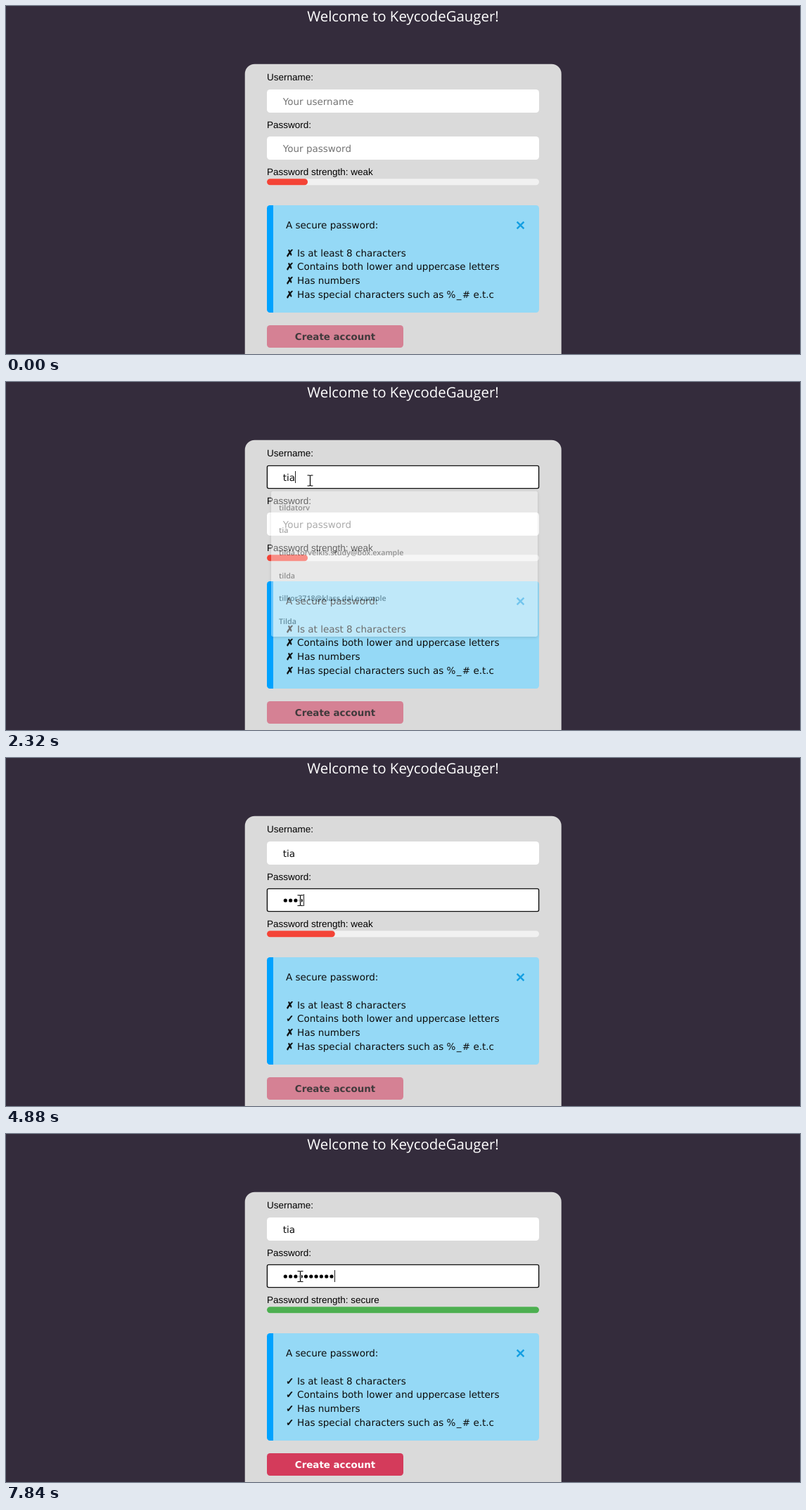
Animation, 1129 px wide and 496 px high, one loop 7.99 s. Source, as an HTML page:

```html
<!DOCTYPE html>
<html lang="en">
<head>
<meta charset="utf-8">
<title>Sign-up form</title>
<style>
html, body { margin: 0; width: 100%; height: 100%; overflow: hidden; background: #342c3c; }
svg { display: block; text-rendering: geometricPrecision; }
text { font: 13.5px "DejaVu Sans", Verdana, sans-serif; fill: #0c0c0c; white-space: pre; }
.title { font: 20.4px "Open Sans", "Noto Sans", sans-serif; fill: #fff; }
.label { font: 13.5px "Liberation Sans", Arial, sans-serif; fill: #000; }
.hint { fill: #757575; }
.btn { font-weight: bold; font-size: 13.4px; }
.mark { stroke: #0c0c0c; stroke-width: .6; }
#menu text { font: 600 10.7px "Open Sans", "Noto Sans", sans-serif; fill: #222; }
#menu rect { fill: #fff; filter: drop-shadow(0 1px 2px rgba(0, 0, 0, .35)); }
.field { fill: #fff; }
.ring { fill: none; stroke: #101010; stroke-width: 1.4; }
#beam path { fill: none; stroke: #fff; stroke-width: 3; }
#beam path + path { stroke: #000; stroke-width: 1.2; }
</style>
</head>
<body>
<svg width="1129" height="496" viewBox="0 0 1129 496">
  <rect width="1129" height="496" fill="#342c3c"/>
  <text class="title" x="564.5" y="21.5" text-anchor="middle">Welcome to KeycodeGauger!</text>
  <rect x="339.7" y="82.7" width="450" height="440" rx="14" fill="#dadada"/>

  <text class="label" x="371" y="106.2">Username:</text>
  <rect class="field" x="371" y="119" width="387" height="33" rx="4.5"/>
  <rect class="ring" id="userRing" x="371.4" y="119.4" width="386.2" height="32.2" rx="2"/>
  <text class="hint" id="userHint" x="393.8" y="140.7">Your username</text>
  <text id="user" x="393.8" y="140.7"></text>

  <text class="label" x="371" y="173.5">Password:</text>
  <rect class="field" x="371" y="186" width="387" height="33" rx="4.5"/>
  <rect class="ring" id="passRing" x="371.4" y="186.4" width="386.2" height="32.2" rx="2"/>
  <text class="hint" id="passHint" x="393.8" y="207.8">Your password</text>
  <g id="dots"></g>
  <rect id="caret" width="1" height="17" fill="#222"/>

  <text class="label" id="strength" x="371" y="240.7"></text>
  <rect x="371" y="246.2" width="387" height="9" rx="4.5" fill="#f1f1f1"/>
  <rect id="bar" x="371" y="246.2" height="9" rx="4.5"/>

  <rect x="371" y="284" width="387" height="153" rx="4.5" fill="#95d9f6"/>
  <path d="M380 284H375.5A4.5 4.5 0 0 0 371 288.5V432.5A4.5 4.5 0 0 0 375.5 437H380Z" fill="#00a2ff"/>
  <text x="398" y="317">A secure password:</text>
  <path d="M726.6 307.6l9.8 9.8m0-9.8l-9.8 9.8" stroke="#149fe2" stroke-width="2.4"/>
  <g id="rules"></g>

  <rect id="button" x="371" y="455" width="194" height="32" rx="4.5"/>
  <text class="btn" id="buttonText" x="468" y="476" text-anchor="middle">Create account</text>

  <g id="menu"><rect x="371" y="152.5" height="207.5" rx="3"/></g>

  <path id="arrow" d="M0 0V14.6L3.4 11.5 5.6 16.6 8 15.6 5.8 10.6H10.4Z" fill="#fff" stroke="#222" stroke-width="1"/>
  <g id="beam">
    <path d="M-4 -7.5H-1L0 -6.8 1 -7.5H4M0 -7V7M-4 7.5H-1L0 6.8 1 7.5H4"/>
    <path d="M-4 -7.5H-1L0 -6.8 1 -7.5H4M0 -7V7M-4 7.5H-1L0 6.8 1 7.5H4"/>
  </g>
</svg>
<script>
const LOOP = 7990, STEP = 79;
const $ = id => document.getElementById(id);
const count = (times, t) => times.filter(x => t >= x).length;
const show = (el, on) => { el.style.display = on ? '' : 'none'; };

function add(parent, tag, attrs) {
  const el = document.createElementNS('http://www.w3.org/2000/svg', tag);
  for (const key in attrs) el.setAttribute(key, attrs[key]);
  return parent.appendChild(el);
}

const NAME = 'tia';
const nameKeys = [1770, 2090, 2240];
const passKeys = [4170, 4420, 4570, 4880, 5110, 5260, 5490, 5960, 6910, 7750];
const caretOff = [[1540, 1770], [2780, 3250], [3940, 4170], [6510, 6910], [7440, 7750]];
const FOCUS_USER = 980, FOCUS_PASS = 3250;

const levels = [
  [0, 'weak', '#f44336', .15],
  [4260, 'weak', '#f44336', .25],
  [6190, 'medium', '#ff9800', .6],
  [7840, 'secure', '#4caf50', 1]
];
const rules = [
  ['Is at least 8 characters', 6190],
  ['Contains both lower and uppercase letters', 4650],
  ['Has numbers', 7840],
  ['Has special characters such as %\u200a_\u200a# e.t.c', 6980]
];
const saved = ['tildatorv', 'tia', 'gelkvist@tiles.example', 'tilda.torvelkis.study@box.example',
  'tilda', 'tilkor3718@klass.dal.example', 'Tilda'];
const matches = saved.filter(s => /^t/i.test(s));

// time, x, y of the pointer
const route = [
  [350, 1112, 484], [430, 1058, 450], [510, 940, 386], [665, 640, 236],
  [825, 462, 154], [905, 432.5, 140.5], [2700, 432.5, 140.5],
  [2930, 429.5, 173], [3090, 427, 190], [3330, 423.5, 200], [3470, 418.5, 203]
];

const marks = rules.map(([label], i) => {
  const y = 356.5 + i * 19.8;
  add($('rules'), 'text', { x: 414, y }).textContent = label;
  return add($('rules'), 'text', { x: 398, y, class: 'mark' });
});
const dots = passKeys.map((_, i) => add($('dots'), 'circle', { cx: 397.3 + i * 7.3, cy: 203, r: 2.6 }));
const menuRect = $('menu').querySelector('rect');
const rows = matches.map((_, i) => add($('menu'), 'text', { x: 382, y: 179.6 + i * 32.4 }));

function pointer(t) {
  if (t < route[0][0]) return null;
  const next = route.findIndex(p => p[0] > t);
  if (next < 0) return route[route.length - 1].slice(1);
  const [t0, x0, y0] = route[next - 1], [t1, x1, y1] = route[next];
  const k = (t - t0) / (t1 - t0);
  return [x0 + (x1 - x0) * k, y0 + (y1 - y0) * k];
}

function stepped(t) {
  for (const [a, b] of [[350, 1140], [2780, 3330]])
    if (t >= a && t < b) return a + Math.floor((t - a) / STEP) * STEP;
  if (t >= 2540 && t < 2780) return 2540;
  return t >= 3330 && t < 3470 ? 3330 : t;
}

function drawMenu(t) {
  const fade = [[1060, .6, 0], [1140, 1, 0], [2240, .78, .35], [2320, .4, 1], [2400, .12, 1.4], [2470, 0, 0]];
  const now = fade[count(fade.map(f => f[0]), t) - 1];
  show($('menu'), now && now[1]);
  if (!now) return;
  const [, alpha, shift] = now;
  $('menu').style.opacity = alpha;
  $('menu').setAttribute('transform', `translate(${6 * shift} ${3 * shift})`);
  menuRect.setAttribute('width', 387 - 8 * shift);
  const list = t < nameKeys[0] ? saved : matches;
  rows.forEach((row, i) => { row.textContent = list[i]; });
}

function drawPointer(t) {
  const p = pointer(stepped(t));
  const inside = (y, top) => y > top && y < top + 33;
  const text = p && p[0] > 371 && p[0] < 758 && (inside(p[1], 119) || inside(p[1], 186));
  show($('beam'), p && text);
  show($('arrow'), p && !text);
  if (p) $(text ? 'beam' : 'arrow').setAttribute('transform', `translate(${p})`);
}

function draw(t) {
  const typed = NAME.slice(0, count(nameKeys, t)), length = count(passKeys, t);
  const inPass = t >= FOCUS_PASS, inUser = t >= FOCUS_USER && !inPass;
  show($('userRing'), inUser);
  show($('passRing'), inPass);
  $('user').textContent = typed;
  show($('userHint'), !typed);
  show($('passHint'), !length);
  dots.forEach((dot, i) => show(dot, i < length));

  show($('caret'), (inUser || inPass) && !caretOff.some(([a, b]) => t >= a && t < b));
  const width = inPass ? length * 7.3 : typed ? $('user').getComputedTextLength() : 0;
  $('caret').setAttribute('x', Math.round(394 + width));
  $('caret').setAttribute('y', inPass ? 194 : 127);

  const [, word, color, part] = levels[count(levels.map(l => l[0]), t) - 1];
  $('strength').textContent = 'Password strength: ' + word;
  $('bar').setAttribute('fill', color);
  $('bar').setAttribute('width', 387 * part);
  rules.forEach(([, time], i) => { marks[i].textContent = t >= time ? '✓' : '✗'; });

  const ready = t >= 6190;
  $('button').setAttribute('fill', ready ? '#d43b5b' : '#d58194');
  $('buttonText').style.fill = ready ? '#fff' : '#403a3c';

  drawMenu(t);
  drawPointer(t);
}

const start = performance.now();
function tick() {
  draw((performance.now() - start) % LOOP);
  requestAnimationFrame(tick);
}
tick();
</script>
</body>
</html>
```
